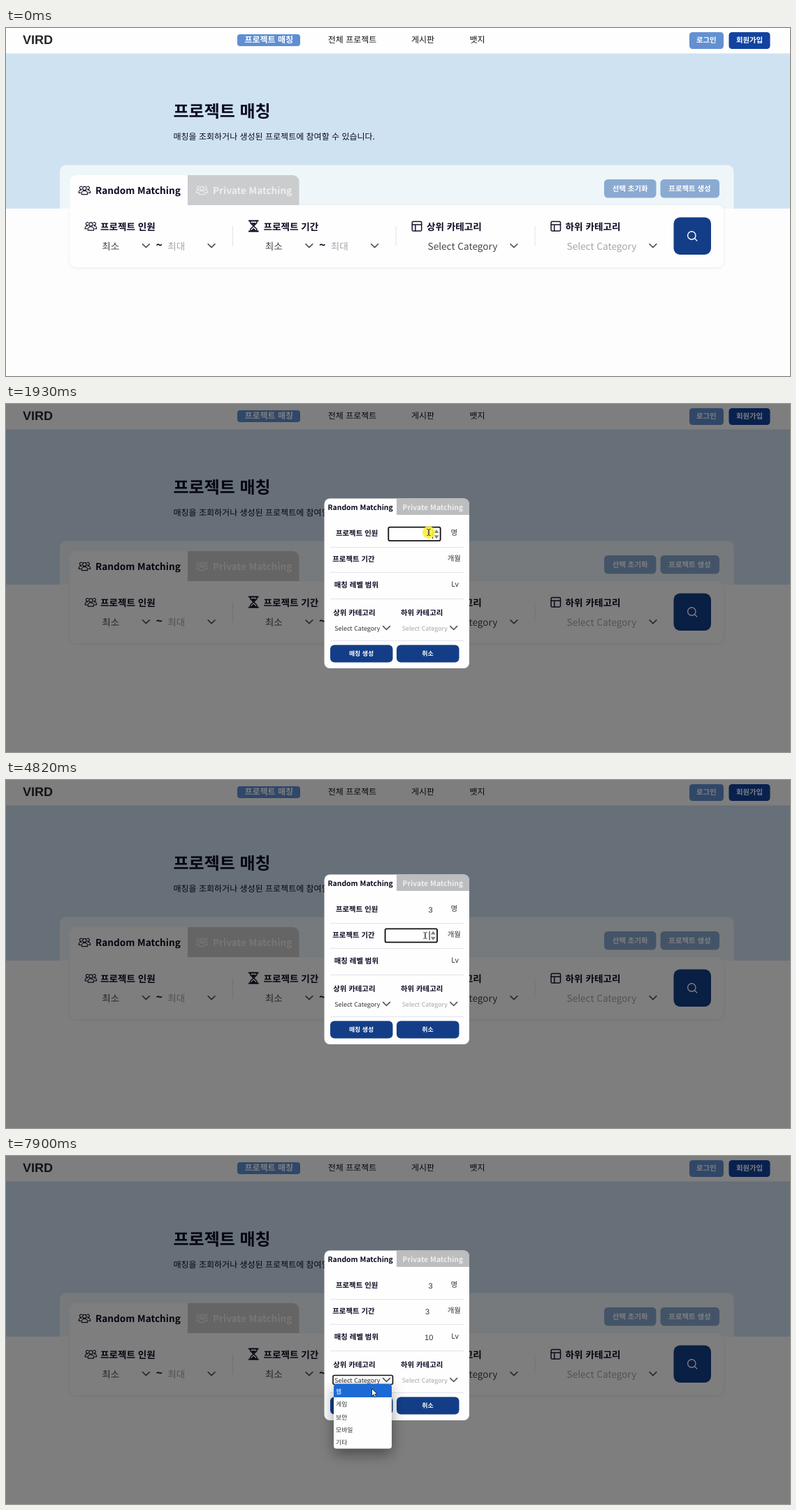
An HTML page for the animation above (8 s loop, 1122 by 499 pixels).

```html
<!DOCTYPE html>
<html lang="ko">
<head>
<meta charset="utf-8">
<title>프로젝트 매칭</title>
<style>
html, body { margin: 0; width: 100%; height: 100%; overflow: hidden; background: #fdfdfd; }
svg { display: block; }
#stage { width: 100vw; height: 100vh; font-family: "Noto Sans CJK KR", "Noto Sans CJK", "Noto Sans", sans-serif; text-rendering: geometricPrecision; }
text { white-space: pre; }
.b { font-weight: 700; }
.m { text-anchor: middle; }
.w { fill: #fff; }
.ink { fill: #0a0a22; }
.t9 { font-size: 8.9px; }
.t10 { font-size: 10.4px; }
.t12 { font-size: 12px; }
.t14 { font-size: 13.6px; }
.num { font: 11px "Liberation Sans", Arial, sans-serif; text-anchor: end; fill: #333; }
.line { fill: none; stroke-linecap: round; stroke-linejoin: round; }
.rule { stroke: #e2e4e8; stroke-width: 1; }
</style>
</head>
<body>
<svg id="stage" viewBox="0 0 1122 499" preserveAspectRatio="none">
<defs>
  <g id="people" class="line" stroke-width="1.15">
    <circle cx="8.8" cy="3.9" r="2.6"/>
    <path d="M4.6 12.6v-1.8a4.2 3.5 0 0 1 8.4 0v1.8z"/>
    <path d="M5.2 1.6a2.1 2.1 0 1 0-.4 3.5M12.4 1.6a2.1 2.1 0 1 1 .4 3.5M4.2 6.2a3.2 3 0 0 0-3.6 2.8v1.4h2.6M13.4 6.2a3.2 3 0 0 1 3.6 2.8v1.4h-2.6"/>
  </g>
  <g id="glass" class="line" stroke="#0a0a22" stroke-width="1.4">
    <path d="M.8 1h13M.8 16h13" stroke-width="1.9"/>
    <path d="M2.8 1v3.2l4.5 4.3-4.5 4.3V16M11.8 1v3.2L7.3 8.5l4.5 4.3V16"/>
    <path d="M4.4 4.2h5.8L7.3 7zM4 15l3.3-3.2 3.3 3.2z" fill="#0a0a22" stroke-width=".8"/>
  </g>
  <g id="layout" class="line" stroke="#15152c" stroke-width="1.5">
    <rect x=".8" y=".8" width="13.4" height="13.4" rx="1.6"/>
    <path d="M.8 5.3h13.4M5.4 14.2V5.3"/>
  </g>
  <path id="chev" class="line" d="M0 0l4.9 4.9 4.9-4.9" stroke="#55585e" stroke-width="1.7"/>
  <g id="range" class="t14">
    <text x="137.3" y="318" fill="#44474d">최소</text>
    <use href="#chev" x="195.5" y="309.8"/>
    <text class="b ink" x="214.6" y="317" font-size="16">~</text>
    <text x="231.2" y="318" fill="#a3a6ac">최대</text>
    <use href="#chev" x="289.2" y="309.8"/>
    <path class="rule" d="M324.5 284v29"/>
  </g>
  <path id="spin" d="M0-6l3.5 5h-7zM0 7.3l3.5-5h-7z" fill="#858585"/>
  <path id="arrow" d="M0 0v10.8l2.5-2.3 1.7 3.9 1.9-.8-1.7-3.8h3.5z" fill="#fff" stroke="#1c1c1c" stroke-width=".9" stroke-linejoin="round"/>
  <path id="beam" class="line" d="M-2.2-4.5q2.2 0 2.2 1.2v6.6q0 1.2-2.2 1.2M2.2-4.5q-2.2 0-2.2 1.2v6.6q0 1.2 2.2 1.2" stroke="#333" stroke-width="1"/>
  <path id="hand" d="M-.9 0q.9-1 1.8 0v4l4 .9q1.4.5 1.2 2l-.8 3.6h-5l-3.2-4.3q.3-1.3 2-.1z" fill="#fff" stroke="#333" stroke-width=".8" stroke-linejoin="round"/>
  <filter id="soft" x="-10%" y="-20%" width="120%" height="150%"><feDropShadow dx="0" dy="1" stdDeviation="2" flood-opacity=".08"/></filter>
  <filter id="drop" x="-40%" y="-40%" width="180%" height="190%"><feDropShadow dx="0" dy="8" stdDeviation="10" flood-opacity=".4"/></filter>
</defs>

<g id="page">
  <rect width="1122" height="499" fill="#fdfdfd"/>
  <rect width="1122" height="36.5" fill="#fefefe"/>
  <rect y="36.5" width="1122" height="222.5" fill="#cfe2f2"/>
  <text x="24" y="23" font-size="18" class="b" fill="#26262a" style="font-family:'Liberation Sans',Arial,sans-serif">VIRD</text>
  <rect x="331" y="9" width="90" height="17" rx="4" fill="#5f8fd3"/>
  <g class="t12" fill="#111">
    <text class="b w m" x="376.2" y="21.2">프로젝트 매칭</text>
    <text x="460.8" y="21.2">전체 프로젝트</text>
    <text x="580" y="21.2">게시판</text>
    <text x="663.5" y="21.2">뱃지</text>
  </g>
  <rect x="978" y="6" width="49" height="24" rx="4.5" fill="#6390d2"/>
  <rect x="1034.5" y="6" width="59" height="24" rx="4.5" fill="#1243a0"/>
  <g class="t10 b w m">
    <text x="1002.3" y="21">로그인</text>
    <text x="1064" y="21">회원가입</text>
  </g>
  <text class="b ink" x="239.5" y="128" font-size="24">프로젝트 매칭</text>
  <text class="t12 ink" x="239.5" y="160.3">매칭을 조회하거나 생성된 프로젝트에 참여할 수 있습니다.</text>

  <path d="M77 259v-53.5a9 9 0 0 1 9-9h946.5a9 9 0 0 1 9 9V259z" fill="#eef6fa"/>
  <rect x="91.5" y="254" width="935.5" height="89" rx="9" fill="#fefefe" filter="url(#soft)"/>
  <path d="M91.5 270v-50a9 9 0 0 1 9-9H260v59z" fill="#fefefe"/>
  <path d="M260 254v-43h150.5a9 9 0 0 1 9 9v34z" fill="#cbcccd"/>
  <use href="#people" x="103.6" y="226" stroke="#15152c"/>
  <use href="#people" x="271.6" y="226" stroke="#ececec"/>
  <g class="t14 b">
    <text class="ink" x="128" y="238.3">Random Matching</text>
    <text fill="#eee" x="296" y="238.3">Private Matching</text>
  </g>
  <rect x="856" y="217" width="74.5" height="26.5" rx="5.5" fill="#8aaad2"/>
  <rect id="create" x="936.5" y="217" width="84.5" height="26.5" rx="5.5" fill="#8aaad2"/>
  <g class="t10 b w m">
    <text x="893.2" y="234">선택 초기화</text>
    <text x="978.5" y="234">프로젝트 생성</text>
  </g>

  <use href="#people" x="112.6" y="277.5" stroke="#15152c"/>
  <use href="#glass" x="347" y="275.5"/>
  <use href="#layout" x="580.5" y="276.8"/>
  <use href="#layout" x="779.3" y="276.8"/>
  <g class="t14 b ink">
    <text x="135" y="290.2">프로젝트 인원</text>
    <text x="368.5" y="290.2">프로젝트 기간</text>
    <text x="602" y="290.2">상위 카테고리</text>
    <text x="800.6" y="290.2">하위 카테고리</text>
  </g>
  <use href="#range"/>
  <use href="#range" x="233.5"/>
  <path class="rule" d="M757 284v29"/>
  <g class="t14">
    <text x="603.6" y="318" fill="#44474d">Select Category</text>
    <text x="802.6" y="318" fill="#a3a6ac">Select Category</text>
  </g>
  <use href="#chev" x="722" y="309.8"/>
  <use href="#chev" x="921" y="309.8"/>
  <rect x="955.5" y="271.5" width="53.5" height="53.5" rx="9" fill="#133e87"/>
  <g class="line" stroke="#fff" stroke-width="1.4"><circle cx="981.3" cy="297.5" r="5.7"/><path d="M985.6 301.8l3.2 3.2"/></g>
</g>

<g id="modal">
  <rect width="1122" height="499" fill="#000" opacity=".5"/>
  <rect x="455.5" y="135.5" width="207.5" height="243.5" rx="8" fill="#fefefe"/>
  <path d="M559 159v-23.5h96a8 8 0 0 1 8 8V159z" fill="#bcbdbf"/>
  <path class="rule" d="M464 205.5h191M464 241.5h191M464 279.5h191M464 339.5h191"/>
  <g class="t10 b ink">
    <text x="460.6" y="151.8">Random Matching</text>
    <text x="567.6" y="151.8" fill="#eee">Private Matching</text>
    <text x="472" y="188.5">프로젝트 인원</text>
    <text x="467.3" y="226">프로젝트 기간</text>
    <text x="469.8" y="262.8">매칭 레벨 범위</text>
    <text x="468.2" y="303">상위 카테고리</text>
    <text x="565" y="303">하위 카테고리</text>
  </g>
  <g class="t10 m" fill="#333">
    <text x="641.3" y="187.8">명</text>
    <text x="641.2" y="225">개월</text>
    <text x="642.5" y="262">Lv</text>
  </g>
  <g class="t9">
    <text x="470.3" y="324.8" fill="#333">Select Category</text>
    <text x="566.8" y="324.8" fill="#a3a6ac">Select Category</text>
  </g>
  <use href="#chev" x="539.6" y="318.6"/>
  <use href="#chev" x="635.8" y="318.6"/>
  <rect x="464" y="345.5" width="89.5" height="25" rx="6" fill="#133e87"/>
  <rect x="559" y="345.5" width="89.5" height="25" rx="6" fill="#133e87"/>
  <g class="t9 b w m">
    <text x="508.5" y="360.8">매칭 생성</text>
    <text x="603.5" y="360.8">취소</text>
  </g>
  <g id="fields"></g>
  <g id="list">
    <rect x="468" y="314.5" width="85.5" height="13" rx="2" fill="none" stroke="#111" stroke-width="1.6"/>
    <rect x="469" y="327" width="83" height="92.5" rx="4" fill="#fefefe" filter="url(#drop)"/>
    <path id="active" d="M469 346v-15a4 4 0 0 1 4-4h75a4 4 0 0 1 4 4v15z" fill="#1c6ad6"/>
    <g class="t9" fill="#333">
      <text id="first" x="472" y="340.6">웹</text>
      <text x="472" y="359.1">게임</text>
      <text x="472" y="377.5">보안</text>
      <text x="472" y="395.9">모바일</text>
      <text x="472" y="414.3">기타</text>
    </g>
  </g>
</g>
<circle id="press" r="9" fill="#fcee3c" opacity=".9"/>
<use id="cursor" href="#arrow"/>
</svg>
<script>
const LOOP = 8000, OPEN = 1030, LIST = 7500, HIGHLIGHT = 7830, BLINK = 450;
const $ = id => document.getElementById(id);
const show = (el, on) => el.setAttribute('visibility', on ? 'inherit' : 'hidden');

// Input rows: left, top, right edge of the number, focus span, edits [time, value]
const rows = [
  { x: 547, y: 176.7, end: 610.6, focus: [1860, 4480], edits: [[1860, ''], [2300, '2'], [2570, '23'], [4200, '3']] },
  { x: 542.3, y: 213.3, end: 606, focus: [4480, 5600], edits: [[4480, ''], [4950, '3']] },
  { x: 547.5, y: 250.6, end: 611.3, focus: [5600, 7450], edits: [[5760, '1'], [5860, '10']] }
];
const W = 75, H = 19.4, SELECT = [3750, 4200];

for (const r of rows) {
  const add = (tag, attrs) => {
    const el = document.createElementNS('http://www.w3.org/2000/svg', tag);
    for (const k in attrs) el.setAttribute(k, attrs[k]);
    return $('fields').appendChild(el);
  };
  r.ring = add('rect', { x: r.x + .3, y: r.y, width: W - .6, height: H, rx: 2, fill: '#fefefe', stroke: '#111', 'stroke-width': 1.8 });
  r.mark = add('rect', { x: r.end - 12.4, y: r.y + 3, width: 12.6, height: 14, fill: '#2c60cf' });
  r.num = add('text', { class: 'num', x: r.end, y: r.y + 13.6 });
  r.spin = add('use', { href: '#spin', x: r.x + 69, y: r.y + 9.3 });
  r.caret = add('rect', { x: r.end - .4, y: r.y + 3.4, width: 1, height: 13, fill: '#111' });
}

// Pointer path: time, x, y
const path = [
  [130, 1088, 448], [550, 982, 209], [690, 984, 215], [900, 995, 224], [1090, 994, 224],
  [1440, 611, 223], [1510, 611, 222], [1720, 612, 186], [1860, 605, 184], [2400, 605, 184],
  [2600, 608, 227], [2740, 604, 230], [2940, 599, 228], [3450, 596, 185], [3650, 596, 185],
  [4060, 652, 193], [4180, 656, 202], [4290, 638, 228], [4410, 600, 223], [5000, 600, 223],
  [5230, 606, 293], [5300, 605, 291], [5560, 592.5, 260], [5760, 592.5, 260], [5880, 612, 262],
  [6090, 612, 263], [6430, 614, 286], [7020, 614, 286], [7420, 540, 320], [7560, 540, 320],
  [7700, 535, 325], [7830, 526, 331], [7900, 523.5, 333.5]
];
const presses = [[840, 940], [1860, 1990], [3650, 3930], [4480, 4610], [5600, 5760], [7450, 7560]];
const within = (t, [a, b]) => t >= a && t < b;

function pointer(t) {
  const i = path.findIndex(p => p[0] > t);
  if (i < 0) return path[path.length - 1].slice(1);
  if (i === 0) return path[0].slice(1);
  const [t0, x0, y0] = path[i - 1], [t1, x1, y1] = path[i];
  const u = (t - t0) / (t1 - t0), e = u * u * (3 - 2 * u);
  return [x0 + (x1 - x0) * e, y0 + (y1 - y0) * e];
}

function draw(t) {
  const [x, y] = pointer(t), open = t >= OPEN;
  let shape = 'arrow';

  for (const r of rows) {
    const focus = within(t, r.focus);
    const hover = open && x > r.x && x < r.x + W && y > r.y && y < r.y + H;
    const edit = r.edits.filter(e => e[0] <= t).pop();
    const marked = r === rows[0] && within(t, SELECT);
    if (hover) shape = 'beam';
    show(r.ring, focus);
    show(r.spin, focus || hover);
    show(r.mark, marked);
    r.num.textContent = edit ? edit[1] : '';
    r.num.style.fill = marked ? '#fff' : '';
    show(r.caret, focus && edit && !marked && Math.floor((t - edit[0]) / BLINK) % 2 === 0);
  }

  if (!open && x > 937 && x < 1021 && y > 217 && y < 243) shape = 'hand';
  $('create').setAttribute('fill', within(t, [720, 1300]) ? '#769bcb' : '#8aaad2');

  show($('modal'), open);
  show($('list'), t >= LIST);
  show($('active'), t >= HIGHLIGHT);
  $('first').style.fill = t >= HIGHLIGHT ? '#fff' : '';

  const c = $('cursor'), p = $('press');
  show(c, t >= 130);
  c.setAttribute('href', '#' + shape);
  c.setAttribute('transform', `translate(${x} ${y})`);
  show(p, presses.some(s => within(t, s)));
  p.setAttribute('cx', x);
  p.setAttribute('cy', y);
}

const start = performance.now();
function tick() {
  draw((performance.now() - start) % LOOP);
  requestAnimationFrame(tick);
}
tick();
</script>
</body>
</html>
```
